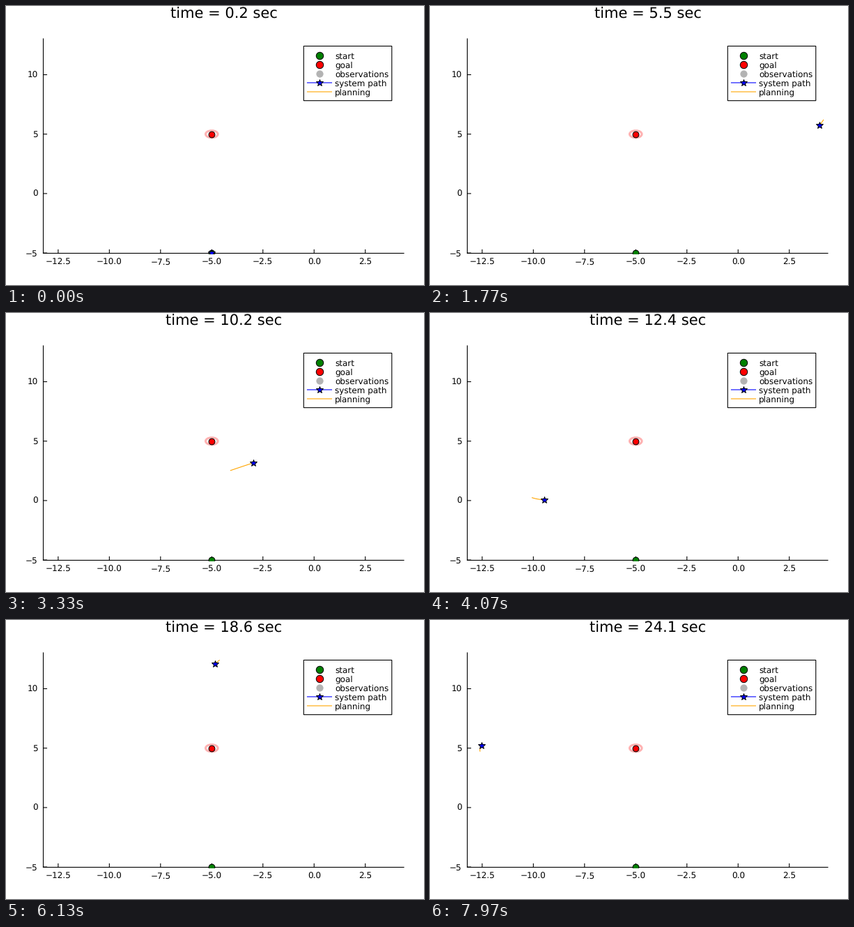
A matplotlib script that plays this animation: 600 by 400 pixels, repeating every 8000 ms.

```python
import numpy as np
import matplotlib.pyplot as plt
from matplotlib.animation import FuncAnimation
from matplotlib.patches import Ellipse, Rectangle

W, H = 600, 400
LOOP, INTERVAL = 8000, 20
STEP = INTERVAL * 0.03       # simulation steps per drawn frame
PX = 0.72                    # points per pixel at 100 dpi
LEFT, RIGHT, TOP, BOTTOM = 53.5, 571, 47, 354.5
HORIZON = 3.6                # steps the planner looks ahead

plt.rcParams.update({"font.family": "DejaVu Sans", "text.hinting": "none"})

# turning points of the vehicle: step, x, y in pixels
KEYS = np.array([
    (0, 295.3, 354), (25, 402, 302), (53, 559, 171), (66, 564, 152),
    (79, 526.3, 150.7), (100, 354.5, 215), (122, 164.2, 267.7),
    (138, 115, 237), (150, 127.5, 212), (161, 176, 154.3), (175, 267.5, 86),
    (193, 309, 53), (208, 271.5, 59), (225, 152, 118), (239, 74.3, 180.3),
    (250, 80, 198)])
T, P = KEYS[:, 0], KEYS[:, 1:]
SLOPE = np.gradient(P, T, axis=0)
SLOPE[0] = 0                 # starts from rest


def path(t):
    """Cubic Hermite curve through the turning points."""
    k = np.clip(np.searchsorted(T, t, side="right") - 1, 0, len(T) - 2)
    h = (T[k + 1] - T[k])[:, None]
    u = (t - T[k])[:, None] / h
    return ((1 + 2 * u) * (1 - u) ** 2 * P[k] + u * (1 - u) ** 2 * h * SLOPE[k]
            + u * u * (3 - 2 * u) * P[k + 1] + u * u * (u - 1) * h * SLOPE[k + 1])


def to_px(x, y):
    return 295.3 + (x + 5) * 29.39, 268.9 - y * 17.04


fig = plt.figure(figsize=(W / 100, H / 100), dpi=100, facecolor="white")
ax = fig.add_axes([0, 0, 1, 1])
ax.set_xlim(0, W)
ax.set_ylim(H, 0)
ax.axis("off")
frame = Rectangle((LEFT, TOP), RIGHT - LEFT, BOTTOM - TOP, transform=ax.transData)


def line(xs, ys, color="black", z=3, width=1.1):
    return ax.plot(xs, ys, color=color, lw=width * PX, zorder=z, snap=False)[0]


def mark(x, y, shape, color, size, edge="black", z=4):
    return ax.plot([x], [y], shape, ms=size * PX, mfc=color, mec=edge,
                   mew=PX, zorder=z, snap=False)[0]


def label(x, y, text, size=12, ha="center"):
    return ax.text(x, y, text, fontsize=size * PX, ha=ha, va="baseline", zorder=8)


def number(v, digits):
    return f"{v:.{digits}f}".replace("-", "\u2212")


# axes
line([LEFT, LEFT], [TOP, BOTTOM])
line([LEFT, RIGHT], [BOTTOM, BOTTOM])
for v in np.arange(-12.5, 3, 2.5):
    x, _ = to_px(v, 0)
    line([x, x], [BOTTOM, BOTTOM - 5])
    label(x, 370.5, number(v, 1))
for v in range(-5, 11, 5):
    _, y = to_px(0, v)
    line([LEFT, LEFT + 5], [y, y])
    label(45.8, y + 4.4, number(v, 0), ha="right")

# goal region, goal and start
goal, start = to_px(-5, 5), to_px(-5, -5)
ax.add_patch(Ellipse(goal, 17.6, 10.2, fill=False, ec=(1, 0, 0, 0.3),
                     lw=3 * PX, zorder=2))
mark(*goal, "o", "red", 8.8)
mark(*start, "o", "green", 8.8).set_clip_path(frame)

# moving parts
plan = line([], [], "orange", z=5)
plan.set_clip_path(frame)
star = mark(*start, "*", "blue", 10, z=6)
star.set_clip_path(frame)
title = label(312.5, 18, "", 21)

# legend
ax.add_patch(Rectangle((427.3, 57.5), 126.5, 78.2, fc="white", ec="black",
                       lw=1.1 * PX, zorder=7, snap=False))
rows = ["start", "goal", "observations", "system path", "planning"]
for i, name in enumerate(rows):
    label(472.3, 75.5 + 13 * i, name, ha="left")
mark(450, 71, "o", "green", 10.4, z=8)
mark(450, 84, "o", "red", 10.4, z=8)
mark(450, 97, "o", "#b3b3b3", 9.2, edge="#b3b3b3", z=8)
line([432.5, 467.5], [110, 110], "blue", z=8)
mark(450, 110, "*", "blue", 11, z=9)
line([432.5, 467.5], [123, 123], "orange", z=8)


def draw(k):
    i = round(k * STEP)
    ahead = path(np.linspace(i, i + HORIZON, 12))
    plan.set_data(ahead[:, 0], ahead[:, 1])
    star.set_data(ahead[:1, 0], ahead[:1, 1])
    title.set_text(f"time = {0.2 + 0.1 * i:.1f} sec")
    return plan, star, title


anim = FuncAnimation(fig, draw, frames=LOOP // INTERVAL, interval=INTERVAL,
                     init_func=lambda: draw(0), repeat=True, repeat_delay=0)
plt.show()
```
